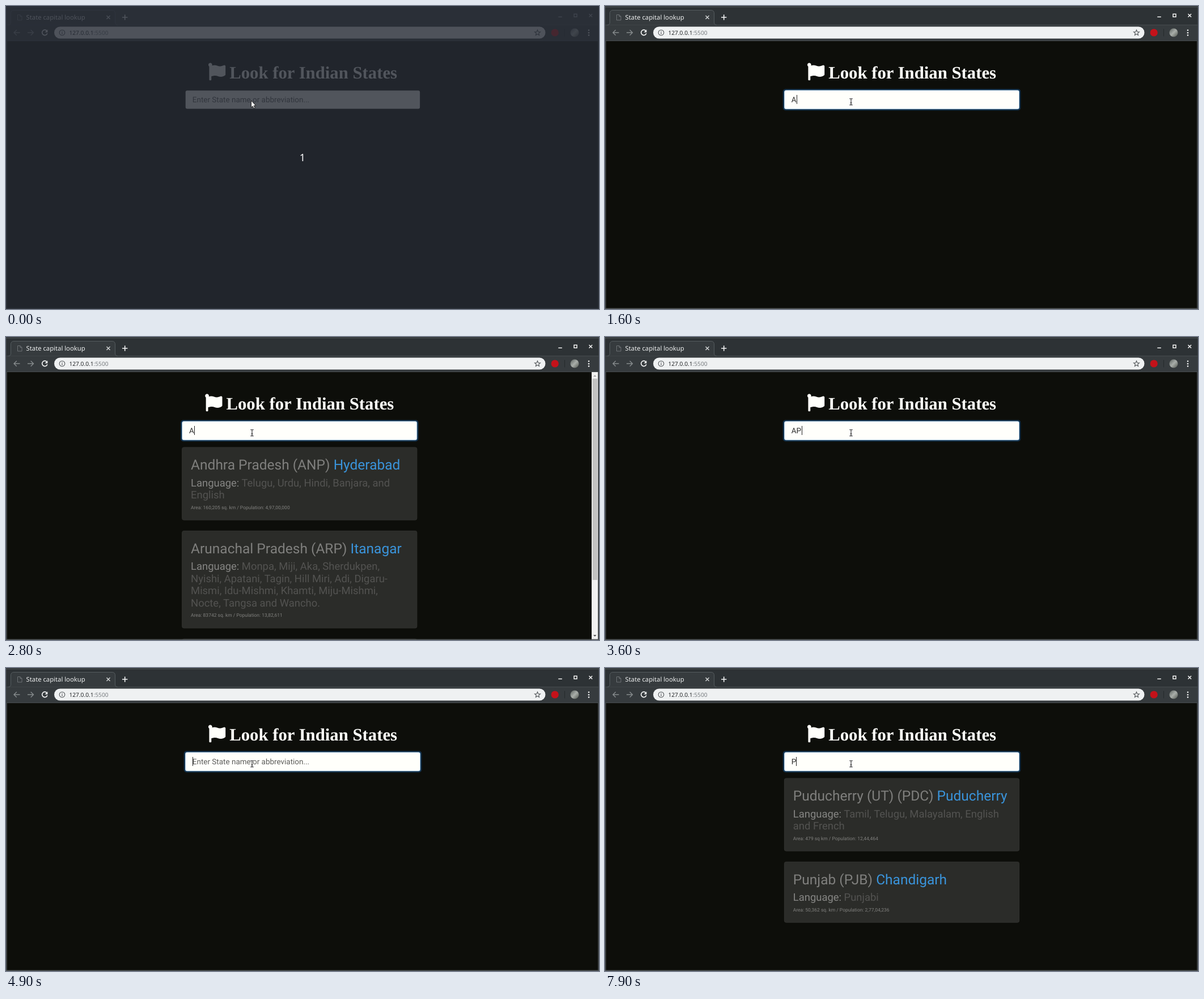
Animation, 1046 px wide and 535 px high, one loop 8 s. Source, as an HTML page:

```html
<!DOCTYPE html>
<html lang="en">
<head>
<meta charset="utf-8">
<title>State capital lookup</title>
<style>
html, body { margin: 0; width: 100%; height: 100%; overflow: hidden; background: #0d0e0a; }
svg { display: block; text-rendering: geometricPrecision; }
.ui { font-family: "Noto Sans", sans-serif; }
.page { font-family: Roboto, sans-serif; }
.line { fill: none; stroke-width: 1.4; }
.crisp { shape-rendering: crispEdges; }
.card rect { fill: #2b2c29; stroke: #31322f; }
.name { font-size: 24.5px; fill: #7f7f7d; }
.name tspan { fill: #3a94db; }
.lang { font-size: 18.43px; fill: #868684; }
.lang tspan { fill: #535351; }
.area { font-size: 8.48px; fill: #80807e; }
</style>
</head>
<body>
<svg width="1046" height="535" viewBox="0 0 1046 535">
  <defs>
    <linearGradient id="photo" x1="0" y1="0" x2="1" y2="1">
      <stop offset="0" stop-color="#59605c"/>
      <stop offset=".5" stop-color="#a9aeaa"/>
      <stop offset="1" stop-color="#50554e"/>
    </linearGradient>
  </defs>

  <g class="page">
    <rect width="1046" height="535" fill="#0d0e0a"/>
    <g id="content">
      <path transform="translate(356.5 100.6) scale(.06)" fill="#fffffb" d="M350 99C296 99 252 64 184 64c-25 0-47 4-68 12a56 56 0 0 0 4-24C118 24 95 1 66 0 34-1 8 24 8 56c0 19 9 36 24 46V488c0 13 11 24 24 24h16c13 0 24-11 24-24v-94c28-12 64-22 114-22 54 0 98 34 166 34 48 0 86-16 122-41 9-6 14-16 14-26V96c0-23-24-39-45-29-35 16-77 32-117 32z"/>
      <text x="394.2" y="127.8" font-family="Liberation Serif, serif" font-weight="bold" font-size="30.75" fill="#fffffb">Look for Indian States</text>
      <g id="ring">
        <rect x="313.7" y="146.4" width="419.6" height="38" rx="5" fill="#12304a"/>
        <rect x="316" y="148.6" width="415" height="33.6" rx="3.5" fill="#9cc4e4"/>
      </g>
      <rect x="316.7" y="149.2" width="413.4" height="32.2" rx="3" fill="#fffffb"/>
      <text id="value" x="328.8" y="170" font-size="13.47"></text>
      <rect id="caret" class="crisp" y="157" width="1" height="16" fill="#222"/>
      <g id="cards"></g>
    </g>
    <g id="scrollbar">
      <rect x="1033" y="62" width="11.5" height="472" fill="#f1f1f1"/>
      <rect x="1034.5" y="73.5" width="8.6" height="355.5" fill="#c1c1c1"/>
      <path d="M1036 70l2.7-3 2.7 3z" fill="#a3a3a3"/>
      <path d="M1036 526l2.7 3 2.7-3z" fill="#505050"/>
    </g>
  </g>

  <g class="ui">
    <rect id="titlebar" width="1046" height="34"/>
    <path d="M0 .5H1046" stroke="#202426"/>
    <path d="M0 1.5H1046" stroke="#555b5e"/>
    <rect y="33" width="1046" height="29" fill="#363b3e"/>
    <path d="M0 33.5H1046M0 61.5H1046" stroke="#464c4f"/>
    <path d="M4 33.5Q8.5 33.5 8.5 29V13Q8.5 7.5 14 7.5H187Q192.5 7.5 192.5 13V29Q192.5 33.5 197 33.5" fill="#363b3e" stroke="#555c5f"/>
    <path d="M20.5 15.5H25L28 18.5V25H20.5ZM25 15.5V18.5H28" class="line" style="stroke-width:1" stroke="#6c7174"/>
    <text x="35.6" y="24" font-size="11.25" fill="#eceeee">State capital lookup</text>
    <path class="line" stroke="#d5d8d9" d="M177.5 17l6 6m0-6l-6 6"/>
    <path class="line" style="stroke-width:1.6" stroke="#f4f5f5" d="M205 20h9.4m-4.7-4.7v9.4"/>
    <g id="controls" class="line">
      <path d="M974.3 19.3h6.5"/>
      <rect x="1002" y="14.2" width="5" height="5"/>
      <path d="M1028.5 14l5.6 5.6m0-5.6l-5.6 5.6"/>
    </g>

    <path class="line" stroke="#858a8c" d="M24.5 47H14m4.8-4.8L14 47l4.8 4.8M38 47h10.5m-4.8-4.8l4.8 4.8-4.8 4.8"/>
    <path class="line" style="stroke-width:1.6" stroke="#f4f5f5" d="M72 43.8A4.7 4.7 0 1 0 72.9 48.3"/>
    <path d="M73.4 41.6v4.8h-4.8z" fill="#f4f5f5"/>
    <rect x="85" y="36.5" width="866.5" height="21" rx="10.5" fill="#eff1f2"/>
    <circle class="line" style="stroke-width:1.1" cx="99" cy="47" r="4.8" stroke="#55595c"/>
    <path d="M99 46.3v3.4M99 44v1.3" stroke="#55595c" stroke-width="1.2"/>
    <text x="111.4" y="50.8" font-size="10.2" fill="#25282a">127.0.0.1<tspan fill="#7a7e81">:5500</tspan></text>
    <path id="star" class="line" style="stroke-width:1.1" stroke="#505457"/>
    <circle cx="968.2" cy="47" r="6.6" fill="#c4121a"/>
    <path d="M985.5 40.5v13" stroke="#25292b"/>
    <circle cx="1003" cy="47" r="7.5" fill="url(#photo)"/>
    <g fill="#f4f5f5"><circle cx="1028" cy="42.8" r="1.3"/><circle cx="1028" cy="47.2" r="1.3"/><circle cx="1028" cy="51.6" r="1.3"/></g>
    <path d="M.5 2V535M1045.5 2V535" stroke="#3a3f42"/>
    <path d="M1.5 62V534M1044.5 62V534" stroke="#4b5052" stroke-width=".8"/>
    <path d="M0 534.2H1046" stroke="#505557" stroke-width="1.6"/>
  </g>

  <g id="countdown" class="ui">
    <rect width="1046" height="535" fill="rgb(38,43,53)" fill-opacity=".8"/>
    <text x="523" y="273.6" font-size="18" text-anchor="middle" fill="#fff">1</text>
    <path d="M432.5 167v12.2l2.7-2.5 1.9 4.3 2-.9-1.9-4.2h3.6z" fill="#fff" stroke="#111" stroke-width=".9"/>
  </g>
  <g id="beam" fill="none">
    <path d="M431.2 163.7h5.6M431.2 174.7h5.6M434 163.7v11" stroke="#fff" stroke-width="3"/>
    <path d="M431.2 163.7h2.2l.6.7.6-.7h2.2M431.2 174.7h2.2l.6-.7.6.7h2.2M434 164v10.5M432.5 171h3" stroke="#222" stroke-width="1.1"/>
  </g>
</svg>
<script>
const $ = id => document.getElementById(id);
const show = (id, on) => $(id).style.display = on ? "" : "none";

const text = (cls, y, s) => `<text class="${cls}" x="331.8" y="${y}">${s}</text>`;

function card(y, height, name, capital, lines, area) {
  const langs = lines.map((s, i) =>
    text("lang", y + 69 + i * 21.5, `${i ? "" : "Language: "}<tspan>${s}</tspan>`));
  return `<g class="card"><rect x="316.4" y="${y + .4}" width="414.2" height="${height - .8}" rx="3"/>` +
    text("name", y + 39.5, `${name} <tspan>${capital}</tspan>`) + langs.join("") +
    text("area", y + 87.7 + (lines.length - 1) * 21.5, area) + "</g>";
}

const results = {
  "": "",
  A: card(194.5, 129, "Andhra Pradesh (ANP)", "Hyderabad",
      ["Telugu, Urdu, Hindi, Banjara, and", "English"],
      "Area: 160,205 sq. km / Population: 4,97,00,000") +
    card(342, 172.3, "Arunachal Pradesh (ARP)", "Itanagar",
      ["Monpa, Miji, Aka, Sherdukpen,", "Nyishi, Apatani, Tagin, Hill Miri, Adi, Digaru-",
       "Mismi, Idu-Mishmi, Khamti, Miju-Mishmi,", "Nocte, Tangsa and Wancho."],
      "Area: 83742 sq. km / Population: 13,82,611") +
    '<g class="card"><rect x="316.4" y="533.2" width="414.2" height="9" rx="3"/></g>',
  P: card(194.5, 129, "Puducherry (UT) (PDC)", "Puducherry",
      ["Tamil, Telugu, Malayalam, English", "and French"],
      "Area: 479 sq km / Population: 12,44,464") +
    card(342, 107.6, "Punjab (PJB)", "Chandigarh", ["Punjabi"],
      "Area: 50,362 sq. km / Population: 2,77,04,236")
};

// start time, typed value, listed results
const typing = [
  [0, "", ""], [1600, "A", ""], [1700, "A", "A"], [3500, "AP", "A"], [3600, "AP", ""],
  [4600, "A", ""], [4700, "A", "A"], [4900, "", ""], [5600, "P", "P"]
];
const caretFlips = [700, 1300, 1600, 2200, 2800, 3400, 3500, 4100, 4900, 5300, 5600, 6100, 6700, 7300, 7900];
const caretX = { "": 329, A: 338, AP: 347, P: 337 };
const focusFade = [0, .35, .8, 1];

$("star").setAttribute("d", "M" + Array.from({ length: 10 }, (_, i) => {
  const a = i * Math.PI / 5, r = i % 2 ? 2.3 : 5.2;
  return (937.5 + r * Math.sin(a)).toFixed(2) + " " + (47.3 - r * Math.cos(a)).toFixed(2);
}).join("L") + "Z");

const mix = (a, b, k) => `rgb(${a.map((v, i) => Math.round(v + (b[i] - v) * k))})`;
let listed;

function draw(t) {
  const [, value, list] = typing.findLast(s => s[0] <= t);
  const focus = focusFade[Math.max(0, Math.min(3, Math.floor((t - 600) / 100)))];
  const scrolls = list === "A";

  show("countdown", t < 500);
  show("beam", t >= 500);
  show("scrollbar", scrolls);
  show("caret", caretFlips.filter(f => f <= t).length % 2);

  $("content").setAttribute("transform", `translate(${scrolls ? -5.75 : 0} 0)`);
  $("ring").setAttribute("opacity", focus);
  $("titlebar").setAttribute("fill", mix([58, 64, 67], [45, 50, 53], focus));
  $("controls").setAttribute("stroke", mix([164, 168, 170], [255, 255, 255], focus));
  $("value").textContent = value || "Enter State name or abbreviation...";
  $("value").setAttribute("fill", value ? "#2c2c2c" : "#5c5c5a");
  $("caret").setAttribute("x", caretX[value]);
  if (list !== listed) $("cards").innerHTML = results[listed = list];
}

function tick() {
  draw(performance.now() % 8000);
  requestAnimationFrame(tick);
}
tick();
</script>
</body>
</html>
```
